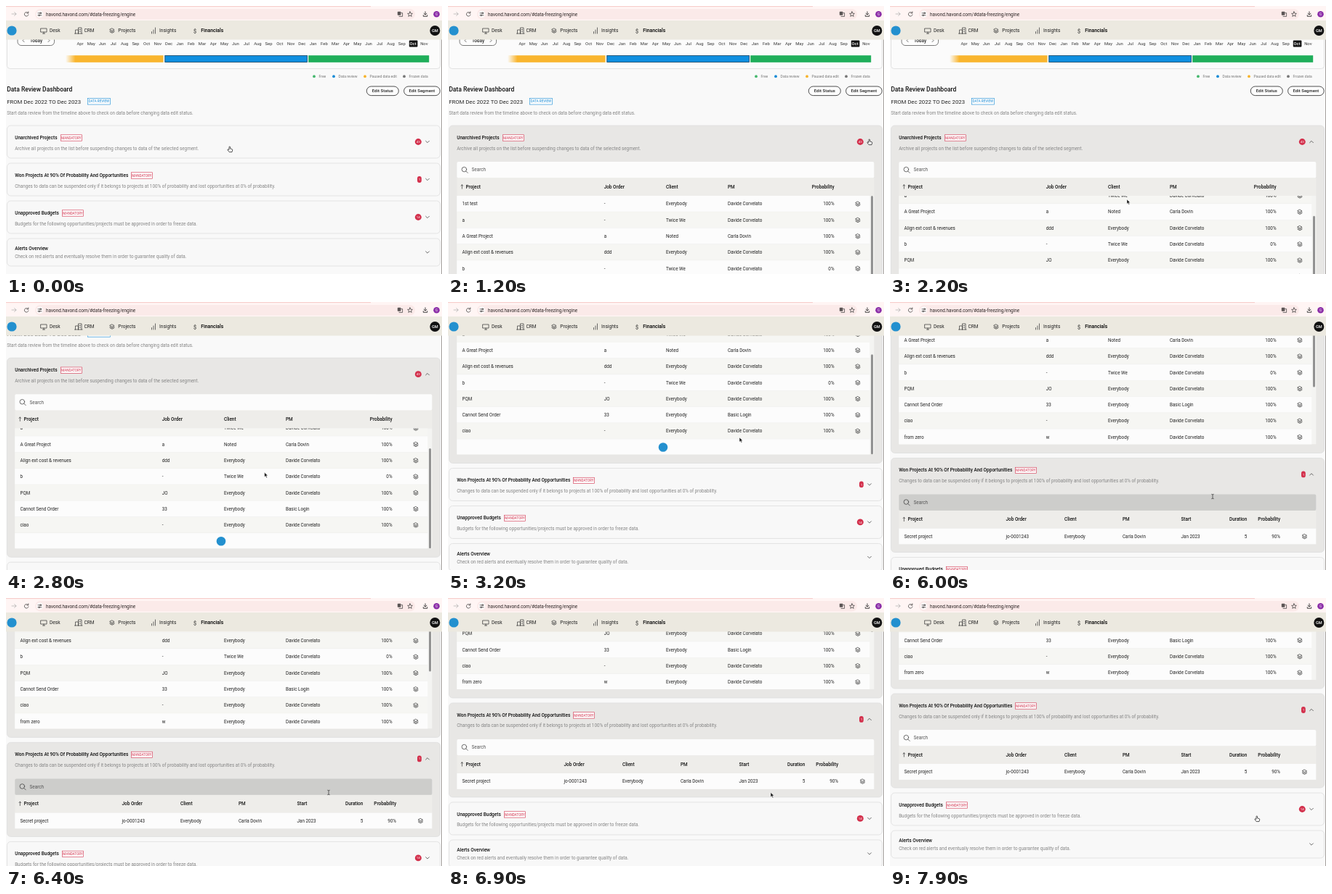
Recreate the animation shown at these times as an HTML page. Size 600 by 370 pixels, loop 8 s.

```html
<!DOCTYPE html>
<html lang="en">
<head>
<meta charset="utf-8">
<title>Data review</title>
<style>
html, body { margin: 0; width: 100%; height: 100%; overflow: hidden; background: #f9f9f9; }
#stage { display: block; width: 600px; height: 370px; font-family: Roboto, Inter, sans-serif; }
.b { font-weight: 500; }
.mid { text-anchor: middle; }
.end { text-anchor: end; }
.line { fill: none; stroke: #333; stroke-width: .7; stroke-linecap: round; stroke-linejoin: round; }
</style>
</head>
<body>
<svg id="stage" viewBox="0 0 600 370"></svg>
<script>
const INK = '#222', GREY = '#858585', RED = '#d3304c', BLUE = '#158ad6';
const ROW = 22.3, BODY = 166, INNER_MAX = 33.5;
const EXTRA1 = 230, EXTRA2 = 85;

// Markup helpers; text is placed by its vertical centre
const text = (x, y, s, size = 6.3, fill = INK, cls = '') =>
  `<text x="${x}" y="${y + size * .355}" font-size="${size}" fill="${fill}" class="${cls}">${s}</text>`;
const rect = (x, y, w, h, fill, more = '') =>
  `<rect x="${x}" y="${y}" width="${w}" height="${h}" fill="${fill}" ${more}/>`;
const circle = (x, y, r, fill) => `<circle cx="${x}" cy="${y}" r="${r}" fill="${fill}"/>`;
const line = (d, more = '') => `<path class="line" d="${d}" ${more}/>`;
const at = (x, y, inner, id = '') => `<g ${id && `id="${id}"`} transform="translate(${x} ${y})">${inner}</g>`;
const layers = (x, y) => at(x, y, line('M0-3L3-1.4L0 .2L-3-1.4ZM-3 .2L0 1.8L3 .2M-3 1.7L0 3.3L3 1.7', 'stroke-width=".6"'));
const lens = (x, y) => at(x, y, `<circle class="line" cx="-.7" cy="-.7" r="3.3"/>` + line('M1.8 1.8L4.2 4.2'));
const tag = (x, y, w, s, color) =>
  rect(x, y - 4.2, w, 8.4, '#fdfdfd', `stroke="${color}" stroke-width=".6"`) + text(x + w / 2, y, s, 4.6, color, 'mid');

function browserBar() {
  return rect(0, 0, 600, 20, '#fff5f4') + rect(0, 0, 502, 1.2, '#f7cfce') + rect(40, 4, 523, 14.5, '#fbeae9', 'rx="7.2"') +
    line('M8 11H14M11.6 8.6L14 11L11.6 13.4', 'stroke="#999" style="stroke:#aaa"') +
    line('M30.4 9.6A2.8 2.8 0 1 0 30.9 12M30.8 7.8V9.9H28.7') +
    circle(46.5, 11.3, 4.8, '#fffafa') +
    line('M44 9.8H46.3M48 9.8H49M44 12.8H45M46.8 12.8H49') +
    '<circle class="line" cx="47.4" cy="9.8" r=".9"/><circle class="line" cx="45.6" cy="12.8" r=".9"/>' +
    text(55, 11.3, 'havond.havond.com/#data-freezing/engine', 6.4, '#2b2424') +
    rect(538.8, 7.8, 4.6, 5, '#5b5555', 'rx=".7"') + line('M541 14.4H545.6V9.6H544') +
    line('M556 7.8L557 10.2L559.4 10.4L557.5 12L558.2 14.4L556 13L553.8 14.4L554.5 12L552.6 10.4L555 10.2Z') +
    line('M577 7.8V12M575 10.2L577 12.2L579 10.2M574.3 12.6V14.3H579.7V12.6', 'style="stroke-width:.9"') +
    circle(592.5, 11.3, 4.3, '#8c2fa8') + text(592.5, 11.3, 'G', 4.5, '#fff', 'mid');
}

function navBar() {
  return rect(0, 20, 600, 26.5, '#ece9e0') + circle(8, 34, 6.6, '#2390cf') +
    line('M48 31H56V36H48ZM50.5 38H53.5M52 36V38') + text(60, 34, 'Desk', 6.6) +
    line('M95.5 38V33H99.5V38M99.5 38V30H104V38M94.5 38H105M101 32.5H102.5M101 35H102.5') + text(107.5, 34, 'CRM', 6.6) +
    layers(146, 34) + text(154.3, 34, 'Projects', 6.6) +
    line('M200.5 38V35.5M203 38V33M205.5 38V30') + text(211, 34, 'Insights', 6.6) +
    text(260, 34, '$', 7.2, INK, 'mid') + text(268.3, 34, 'Financials', 6.8, '#000', 'b') +
    circle(590.3, 34, 7, '#111') + text(590.3, 34, 'GM', 5.6, '#fff', 'b mid');
}

function timeline() {
  const names = 'Jan Feb Mar Apr May Jun Jul Aug Sep Oct Nov Dec'.split(' ');
  let out = rect(1.5, 30, 596, 56.5, '#fbfbfb', 'rx="4" stroke="#dcdcdc" stroke-width=".8"') +
    rect(16, 38, 50.5, 16.5, '#fdfdfd', 'rx="5" stroke="#444" stroke-width=".7"') +
    text(41.5, 47.5, 'Today', 6.4, INK, 'b mid') +
    line('M25 45.6L23 47.6L25 49.6M58 45.6L60 47.6L58 49.6') +
    rect(554.8, 47.6, 11.6, 8.8, '#111', 'rx="1"');
  for (let i = 0; i < 32; i++) {
    const now = i === 30;
    out += text(102 + i * 15.27, 52, names[(i + 3) % 12], 5.9, now ? '#fff' : '#333', 'mid' + (now ? ' b' : ''));
  }
  out += rect(82, 68.2, 134.5, 9.6, 'url(#fade)') +
    rect(218.8, 68.5, 195.7, 9, '#0f8fe0', 'stroke="#12405f" stroke-width=".8"') +
    rect(416.2, 68.2, 166, 9.6, '#1fae5a');
  [[424, 'Free', '#44b76c'], [451, 'Data review', BLUE], [494, 'Paused data edit', '#f7b32b'], [548, 'Frozen data', '#777']]
    .forEach(([x, s, c]) => out += circle(x, 97.2, 1.9, c) + text(x + 6.6, 97.2, s, 5, '#777'));
  return out;
}

function heading() {
  const button = (x, w, s) => rect(x, 111, w, 12.6, '#fdfdfd', 'rx="6.3" stroke="#222" stroke-width=".8"') +
    text(x + w / 2, 117.2, s, 6, INK, 'b mid');
  return text(1.2, 114.5, 'Data Review Dashboard', 8.5, '#111', 'b') +
    text(1.2, 131.8, 'FROM Dec 2022 TO Dec 2023', 7.75) +
    tag(112.3, 131.8, 31, 'DATA REVIEW', BLUE) +
    text(1.2, 148, 'Start data review from the timeline above to check on data before changing data edit status.', 6.3, GREY) +
    button(496.3, 44, 'Edit Status') + button(547.6, 49.6, 'Edit Segment');
}

function card(n, title, about, tagX, count, extra = '') {
  const small = !tagX, mid = small ? 19 : 22.5;
  const w = count > 9 ? 9 : 5.8;
  return at(0, 0,
    rect(1.5, 0, 596, small ? 38 : 45, '#f8f8f8', `id="box${n}" rx="5" stroke="#dedede" stroke-width=".8"`) +
    text(12.2, small ? 14 : 16.7, title, 6.5, '#111', 'b') +
    text(12.2, small ? 25 : 31.3, about, 6.3, GREY) +
    (small ? '' : tag(tagX, 17, 29, 'MANDATORY', RED) +
      rect(571.8 - w, mid - 4.4, w, 8.8, RED, `rx="${w / 2}"`) + text(571.8 - w / 2, mid, count, 4.4, '#fff', 'mid')) +
    at(580, mid, line('M-2.4-1.2L0 1.2L2.4-1.2'), 'chev' + n) + extra, 'card' + n);
}

function table(n, cols, body) {
  const head = cols.map(([x, s, cls = '']) => text(x, 84.5, s, 6.4, '#111', 'b ' + cls)).join('');
  return `<svg id="table${n}" width="600" height="0" overflow="hidden">` +
    rect(12.3, 50, 574, 22.5, '#fcfcfc', `id="search${n}" rx="2"`) + lens(23, 61.3) + text(32.5, 61.2, 'Search', 6.4, '#555') +
    body + rect(12.3, 72.5, 574, 24.5, '#eeedea') + line('M19.3 87.2V81.8M18 83.2L19.3 81.8L20.6 83.2') + head + '</svg>';
}

const pm = 'Davide Corvelato', client = 'Everybody';
const projects = [
  ['1st test', '-', client, pm, '100%'], ['a', '-', 'Twice We', pm, '100%'],
  ['A Great Project', 'a', 'Noted', 'Carla Dovin', '100%'], ['Align ext cost &amp; revenues', 'ddd', client, pm, '100%'],
  ['b', '-', 'Twice We', pm, '0%'], ['PQM', 'JO', client, pm, '100%'],
  ['Cannot Send Order', '33', client, 'Basic Login', '100%'], ['ciao', '-', client, pm, '100%'],
  ['from zero', 'w', client, pm, '100%']
];
const cols1 = [[24.5, 'Project'], [214.7, 'Job Order'], [300, 'Client'], [385, 'PM'], [531.5, 'Probability', 'end']];
const cols2 = [[24.5, 'Project'], [159.5, 'Job Order'], [240, 'Client'], [320, 'PM'], [400.5, 'Start'],
  [491.3, 'Duration', 'end'], [537, 'Probability', 'end']];

function row(cols, cells, y, iconX, width, fill) {
  return rect(12.3, y, width, ROW, fill) + rect(12.3, y + ROW - .4, width, .4, '#e6e6e4') +
    cells.map((s, i) => text(i ? cols[i][0] : 19.5, y + ROW / 2, s, 6.3, INK, cols[i][2])).join('') + layers(iconX, y + ROW / 2);
}
const rows = projects.map((cells, i) => {
  const inner = row(cols1, cells, i * ROW, 564, 568, i % 2 ? '#f6f6f3' : '#fcfcfc');
  return i === 8 ? `<g id="loaded">${inner}</g>` : inner;
}).join('');
const spinner = `<g id="spinner">${rect(12.3, 8 * ROW, 568, ROW, '#fcfcfc')}${circle(296, 8.5 * ROW, 6.3, '#2390cf')}</g>`;
const body1 = `<svg y="97" width="600" height="${BODY}" overflow="hidden">` + rect(12.3, 0, 574, BODY, '#f4f4f2') +
  at(0, 0, rows + spinner, 'rows') + rect(582, 0, 3, 10, '#929292', 'id="thumb" rx="1.5"') + '</svg>';
const body2 = row(cols2, ['Secret project', 'jo-0001243', client, 'Carla Dovin', 'Jan 2023', '5', '90%'], 97, 570.5, 574, '#fcfcfc');

const pointers = {
  hand: '<path d="M-1-3.2C-1-4.3 .6-4.3 .6-3.2V-1L3-.4Q4 0 3.7 1L3 3.6H-.8L-3 .8Q-3-.5-1.9-.2L-1 .5Z" fill="#fff" stroke="#111" stroke-width=".7"/>',
  arrow: '<path d="M0 0V6.2L1.5 4.9L2.6 7.3L3.7 6.8L2.6 4.5H4.6Z" fill="#111" stroke="#fff" stroke-width=".5"/>',
  beam: line('M-1.3-3.2Q0-3.2 0-2.4V2.4Q0 3.2-1.3 3.2M1.3-3.2Q0-3.2 0-2.4M0 2.4Q0 3.2 1.3 3.2')
};

document.getElementById('stage').innerHTML =
  `<defs><linearGradient id="fade"><stop offset="0" stop-color="#f9b52e" stop-opacity="0"/>
   <stop offset=".1" stop-color="#f9b52e"/></linearGradient></defs>` +
  rect(0, 0, 600, 370, '#f9f9f9') +
  at(0, 0, timeline() + heading() +
    card(1, 'Unarchived Projects', 'Archive all projects on the list before suspending changes to data of the selected segment.', 75.3, 43, table(1, cols1, body1)) +
    card(2, 'Won Projects At 90% Of Probability And Opportunities', 'Changes to data can be suspended only if it belongs to projects at 100% of probability and lost opportunities at 0% of probability.', 172.3, 1, table(2, cols2, body2)) +
    card(3, 'Unapproved Budgets', 'Budgets for the following opportunities/projects must be approved in order to freeze data.', 77.5, 14) +
    card(4, 'Alerts Overview', 'Check on red alerts and eventually resolve them in order to guarantee quality of data.'), 'page') +
  rect(599.2, 20, .8, 350, '#8f8a86') + navBar() + browserBar() +
  at(0, 0, Object.entries(pointers).map(([k, p]) => `<g id="${k}">${p}</g>`).join(''), 'cursor');

const $ = id => document.getElementById(id);
const set = (id, name, value) => $(id).setAttribute(name, value);
const move = (id, x, y) => set(id, 'transform', `translate(${x} ${y})`);
const show = (id, on) => set(id, 'visibility', on ? 'visible' : 'hidden');
const clamp = v => Math.min(1, Math.max(0, v));
const smooth = v => (v = clamp(v), v * v * (3 - 2 * v));

// Value of a [time, value] track at time t
function track(keys, t, ease = clamp) {
  let i = 0;
  while (i < keys.length - 2 && t >= keys[i + 1][0]) i++;
  const [t0, a] = keys[i], [t1, b] = keys[i + 1];
  return a + (b - a) * ease((t - t0) / (t1 - t0));
}
const pageScroll = [[2500, 0], [2700, 55], [3200, 217.5], [3500, 230], [5900, 230], [6000, 231.5], [6400, 247.5], [6900, 302], [7200, 315]];
const innerScroll = [[1750, 0], [2100, INNER_MAX]];
const cursorX = [[0, 308], [900, 580], [1300, 580], [1900, 326], [2500, 326], [3200, 401], [3800, 401], [4500, 580], [5100, 580], [5700, 444], [7300, 444], [7900, 505]];
const cursorY = [[0, 198], [900, 188], [1300, 188], [1900, 267], [2500, 267], [3200, 187], [3800, 187], [4500, 247], [5100, 247], [5700, 268.5], [7300, 268.5], [7900, 305]];

function setCard(n, y, open, extra) {
  move('card' + n, 0, y);
  set('box' + n, 'height', 45 + extra * open);
  set('box' + n, 'fill', open ? '#e8e7e5' : '#f8f8f8');
  set('table' + n, 'height', open && 34 + extra * open);
  set('chev' + n, 'transform', `translate(580 22.5) scale(1 ${1 - 2 * open})`);
}

function draw(t) {
  const open1 = smooth((t - 1000) / 300), open2 = smooth((t - 4700) / 300);
  const scroll = track(pageScroll, t), inner = track(innerScroll, t);
  const y2 = 217 + EXTRA1 * open1, shift = EXTRA1 * open1 + EXTRA2 * open2;
  move('page', 0, -scroll);
  setCard(1, 165, open1, EXTRA1);
  setCard(2, y2, open2, EXTRA2);
  move('card3', 0, 269 + shift);
  move('card4', 0, 321 + shift);

  const loaded = t >= 3500, content = loaded ? 380 : BODY + INNER_MAX;
  move('rows', 0, -inner);
  show('loaded', loaded);
  show('spinner', !loaded);
  set('thumb', 'y', inner * BODY / content);
  set('thumb', 'height', BODY * BODY / content);

  const x = track(cursorX, t, smooth), y = track(cursorY, t, smooth);
  const below = y + scroll - y2 - 50;
  const overSearch = open2 === 1 && below > 0 && below < 24;
  set('search2', 'fill', overSearch ? '#cdcdcb' : '#fcfcfc');
  const kind = overSearch ? 'beam' : t < 1450 || t > 4050 && t < 5400 || t > 7200 ? 'hand' : 'arrow';
  for (const k in pointers) show(k, k === kind);
  move('cursor', x, y);
}

const start = performance.now();
(function loop() {
  draw((performance.now() - start) % 8000);
  requestAnimationFrame(loop);
})();
</script>
</body>
</html>
```
